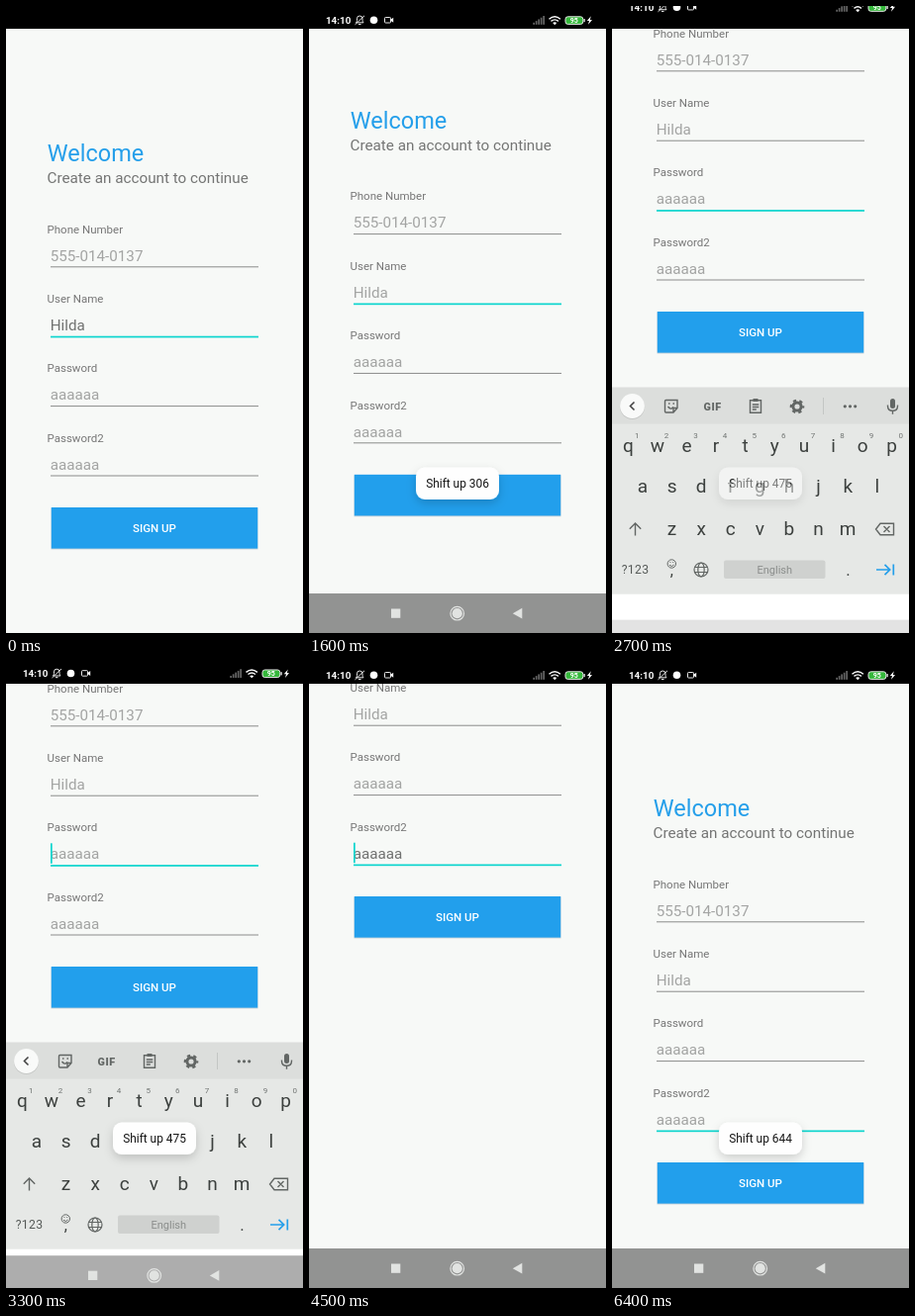
An HTML page for the animation above (6700 ms loop, 300 by 634 pixels).

```html
<!DOCTYPE html>
<html lang="en">
<head>
<meta charset="utf-8">
<title>Sign up form</title>
<style>
  html, body { margin: 0; width: 100%; height: 100%; overflow: hidden; background: #f7f9f7; }
  svg { display: block; width: 300px; height: 634px; font-family: Roboto, "Noto Sans", sans-serif; }
  .label { font-size: 11.5px; fill: #777; }
  .value { font-size: 15.2px; fill: #a3a4a3; }
  .value.pressed { fill: #707170; }
  .line { fill: #8b8c8b; }
  .line.focus, #caret { fill: #0cd5ce; }
  .key { font-size: 19px; fill: #3c403e; text-anchor: middle; }
  .hint { font-size: 8px; fill: #6f7371; text-anchor: middle; }
  .icon { fill: none; stroke: #626664; stroke-width: 1.4; }
  .solid { fill: #626664; }
  .go { fill: none; stroke: #259fea; stroke-width: 1.7; }
  .mid { text-anchor: middle; }
</style>
</head>
<body>
<svg viewBox="0 0 300 634">
  <defs>
    <filter id="soft" x="-40%" y="-60%" width="180%" height="260%">
      <feDropShadow dx="0" dy="4" stdDeviation="5" flood-color="#000" flood-opacity=".17"/>
    </filter>
  </defs>
  <rect width="300" height="634" fill="#f7f9f7"/>

  <g id="form">
    <text x="41.8" y="156.7" font-size="23.5" fill="#259fea">Welcome</text>
    <text x="41.5" y="179.4" font-size="15.25" fill="#747574">Create an account to continue</text>
    <g id="fields"></g>
    <rect id="caret" x="45" width="1.7" height="20.5"/>
    <rect x="45.5" y="507.5" width="209" height="42" fill="#c9d3da"/>
    <rect x="45.8" y="507" width="208.4" height="41.6" fill="#229fec"/>
    <text class="mid" x="150" y="532.4" font-size="11.5" font-weight="500" fill="#fff">SIGN UP</text>
  </g>

  <g id="keyboard">
    <rect y="385" width="300" height="2" fill="#000" opacity=".06"/>
    <rect y="386" width="300" height="248" fill="#fff"/>
    <rect y="386" width="300" height="208.7" fill="#e6e8e6"/>
    <rect y="386" width="300" height="36.5" fill="#dcdedc"/>
    <circle cx="20.5" cy="405.3" r="12.6" fill="#000" opacity=".1"/>
    <circle cx="20.5" cy="404.5" r="12.4" fill="#f9faf9"/>
    <path class="icon" d="M22.5 400.5l-4 4 4 4" style="stroke:#444;stroke-width:1.6"/>
    <g class="icon">
      <path d="M54.5 398.5h11.500v8l-4 4.500h-7.500q-1 0-1-1v-10.500q0-1 1-1zM66 406.500h-4v4.500"/>
      <path d="M56.500 405q3 4 5.500.500M57 402h1.500M61.500 402h1.500"/>
      <path d="M139.500 398.800h11v12.500h-11zM141.800 403h6.500M141.800 405.500h6.500M141.800 408h4"/>
      <path d="M142.500 398.500h5" stroke-width="3"/>
      <circle cx="187" cy="405" r="4.100" stroke-width="3"/>
      <circle cx="187" cy="405" r="6.200" stroke-width="2.200" stroke-dasharray="3.200 3.293" stroke-dashoffset="1.600"/>
      <path d="M278.500 403.500v1q0 4.800 5 4.800t5-4.800v-1M283.500 409.300v3.500"/>
    </g>
    <text class="mid solid" x="101.700" y="408.600" font-size="10.800" font-weight="900" letter-spacing=".6">GIF</text>
    <path d="M213.500 396v17" stroke="#c3c6c4"/>
    <g class="solid">
      <circle cx="235.300" cy="404.800" r="1.600"/><circle cx="240.500" cy="404.800" r="1.600"/><circle cx="245.700" cy="404.800" r="1.600"/>
      <rect x="281" y="397" width="5" height="10" rx="2.500"/>
    </g>
    <g id="keys"></g>
    <g class="icon">
      <path d="M23.500 535.500v-12.500M17.800 528.800l5.700-5.800 5.700 5.800"/>
      <path d="M271 523.300h13.500v11.400h-13.500l-4.500-5.700zM274.500 526l6 6M280.500 526l-6 6"/>
      <circle cx="60.300" cy="564" r="4.200" stroke-width="1"/>
      <path d="M58 565.200q2.300 2.600 4.600 0M58.500 562.500h.9M61.300 562.500h.9" stroke-width="1"/>
      <g stroke-width="1.200">
        <circle cx="90" cy="570" r="7"/><ellipse cx="90" cy="570" rx="3.200" ry="7"/>
        <path d="M83.500 567.500h13M83.500 572.500h13"/>
      </g>
    </g>
    <text x="9.800" y="574.200" font-size="12.200" fill="#555957" letter-spacing=".3">?123</text>
    <text class="key" x="60.300" y="576" style="font-size:16px">,</text>
    <text class="key" x="238.500" y="576" style="font-size:17px">.</text>
    <rect x="113" y="560.500" width="102.500" height="18.500" rx="2" fill="#cfd1cf"/>
    <text class="mid" x="164.300" y="573.600" font-size="11" fill="#8b8e8c">English</text>
    <path id="next" class="go" d="M267 570h13.500M275.500 564.800l5.200 5.200-5.200 5.200M284.300 564.500v11"/>
    <path id="done" class="go" d="M268.500 570.500l4.500 4.500 11-10.500"/>
  </g>

  <g id="toast">
    <rect x="108" y="466.500" width="84" height="32.500" rx="9" fill="#fefefe" filter="url(#soft)"/>
    <text id="message" class="mid" x="150" y="487" font-size="11.900" fill="#151515"></text>
  </g>

  <g id="nav">
    <rect id="shade" y="594" width="300" height="40"/>
    <g fill="#e1e3e1">
      <rect x="83" y="609.500" width="9.300" height="9.300"/>
      <circle cx="149.700" cy="614.200" r="5.100"/>
      <circle cx="149.700" cy="614.200" r="6.800" fill="none" stroke="#e1e3e1" stroke-width="1.200"/>
      <path d="M215.300 608.800v10.800l-9.500-5.400z"/>
    </g>
  </g>

  <rect width="300" height="23" fill="#000"/>
  <g id="status" fill="#fff">
    <text x="17" y="18" font-size="9.800" font-weight="700">14:10</text>
    <g fill="none" stroke="#e8e8e8" stroke-width="1">
      <path d="M47.500 16.800h7.500q-1-1-1-2.500v-1.500q0-2.800-2.800-2.800t-2.700 2.800v1.500q0 1.500-1 2.500zM50 18.500h2.500M46.500 18.800l9.500-9"/>
      <rect x="76.500" y="11.500" width="6" height="5.500" rx=".8"/>
    </g>
    <path d="M82.500 13.800l2.700-2v5l-2.700-2z"/>
    <circle cx="65.500" cy="14.300" r="3.800"/>
    <g id="signal" fill="#656565"></g>
    <g fill="none" stroke="#fff" stroke-width="1.400">
      <path d="M242.500 13.200q5.700-4.800 11.400 0M244.500 15.400q3.700-3 7.400 0"/>
    </g>
    <path d="M246.200 17q2-1.500 4 0l-2 2.200z"/>
    <rect x="259" y="10.800" width="17.800" height="7.600" rx="2.500" fill="#35b83b" stroke="#e8e8e8"/>
    <rect x="277.500" y="13" width="1.200" height="3.200"/>
    <text class="mid" x="267.800" y="17.100" font-size="7" font-weight="700">95</text>
    <path d="M284.800 10.300l-4 4.800h2.200l-1 3.700 4-4.900h-2.200z"/>
  </g>
</svg>
<script>
const LOOP = 6700, STEP = 100, ROW = 70.4;
const $ = id => document.getElementById(id);

// Rows of [time in ms, value]
const formShift = [[0, 0], [300, 128], [1400, 128], [1700, 0], [2100, 0], [2300, 198],
  [3600, 198], [3900, 0], [4200, 0], [4400, 269], [5900, 269], [6100, 0]];
const keyboardUp = [[200, 0], [600, 1], [1300, 1], [1600, 0], [2300, 0], [2700, 1],
  [3500, 1], [3700, 0], [4500, 0], [4900, 1], [5900, 1], [6200, 0]];
const barsIn = [[900, 0], [1000, .3], [1100, .82], [1200, 1], [2500, 1], [2800, 0],
  [3100, 0], [3200, .3], [3300, .82], [3400, 1], [4800, 1], [5100, 0],
  [5500, 0], [5600, .3], [5700, .82], [5800, 1]];
const toastIn = [[500, 0], [700, 1], [1700, 1], [1900, 0], [2600, 0], [2800, 1],
  [4100, 1], [4300, 0], [4900, 0], [5100, 1]];

const rounds = [
  { from: 0, field: 1, blink: 100, press: [0, 100], toast: 306 },
  { from: 2100, field: 2, blink: 2150, press: [2100, 2300], toast: 475 },
  { from: 4300, field: 3, blink: 4450, press: [4300, 4600], toast: 644 }
];

const linear = p => p;
const smooth = p => p * p * (3 - 2 * p);

function sample(rows, t, ease = linear) {
  const i = rows.findIndex(row => row[0] > t);
  if (i === 0) return rows[0][1];
  if (i < 0) return rows[rows.length - 1][1];
  const [t0, a] = rows[i - 1], [t1, b] = rows[i];
  return a + (b - a) * ease((t - t0) / (t1 - t0));
}

function add(parent, tag, attrs, text = "") {
  const el = document.createElementNS("http://www.w3.org/2000/svg", tag);
  for (const name in attrs) el.setAttribute(name, attrs[name]);
  el.textContent = text;
  return parent.appendChild(el);
}

const fields = [
  ["Phone Number", "555-014-0137"], ["User Name", "Hilda"],
  ["Password", "aaaaaa"], ["Password2", "aaaaaa"]
].map(([label, text], i) => {
  const y = i * ROW;
  add($("fields"), "text", { class: "label", x: 41.5, y: 229.5 + y }, label);
  return {
    value: add($("fields"), "text", { class: "value", x: 44.7, y: 257.6 + y }, text),
    line: add($("fields"), "rect", { class: "line", x: 45, y: 263.3 + y, width: 210, height: 1 })
  };
});

[["qwertyuiop", 16.3, 450.5], ["asdfghjkl", 31, 492.3], ["zxcvbnm", 60.5, 534.8]]
  .forEach(([letters, x0, y], row) => [...letters].forEach((letter, i) => {
    const x = x0 + i * 29.6;
    add($("keys"), "text", { class: "key", x, y }, letter);
    if (row === 0) add($("keys"), "text", { class: "hint", x: x + 9, y: 437 }, (i + 1) % 10);
  }));

for (let i = 0; i < 5; i++)
  add($("signal"), "rect", { x: 226.3 + i * 2.5, y: 16.8 - i * 1.7, width: 1.7, height: 2 + i * 1.7 });

const move = (id, y) => $(id).setAttribute("transform", `translate(0 ${y})`);
const show = (id, on) => $(id).setAttribute("opacity", +on);

function draw(t) {
  const round = rounds.filter(r => r.from <= t).pop();
  const bars = sample(barsIn, t);
  const up = sample(keyboardUp, t, smooth);

  move("form", -sample(formShift, t, smooth));
  move("keyboard", 250 * (1 - up));
  move("nav", 40 * (1 - bars));
  move("status", -24 * (1 - bars) ** 1.5);
  $("shade").setAttribute("opacity", .41 * bars ** 1.2);
  show("nav", bars > 0);

  fields.forEach(({ value, line }, i) => {
    const focus = i === round.field;
    value.classList.toggle("pressed", focus && t >= round.press[0] && t < round.press[1]);
    line.classList.toggle("focus", focus);
    line.setAttribute("height", focus ? 1.7 : 1);
  });
  const age = t - round.blink;
  $("caret").setAttribute("y", 241.5 + round.field * ROW);
  show("caret", age >= 0 && age % 1000 < 500 && t < 6400);

  show("next", round.field < 3);
  show("done", round.field === 3);
  $("message").textContent = "Shift up " + (t < 2300 ? 306 : t < 4400 ? 475 : round.toast);
  $("toast").setAttribute("opacity", sample(toastIn, t));
}

const start = performance.now();
function tick() {
  const t = (performance.now() - start) % LOOP;
  draw(Math.floor(t / STEP) * STEP);
  requestAnimationFrame(tick);
}
tick();
</script>
</body>
</html>
```
